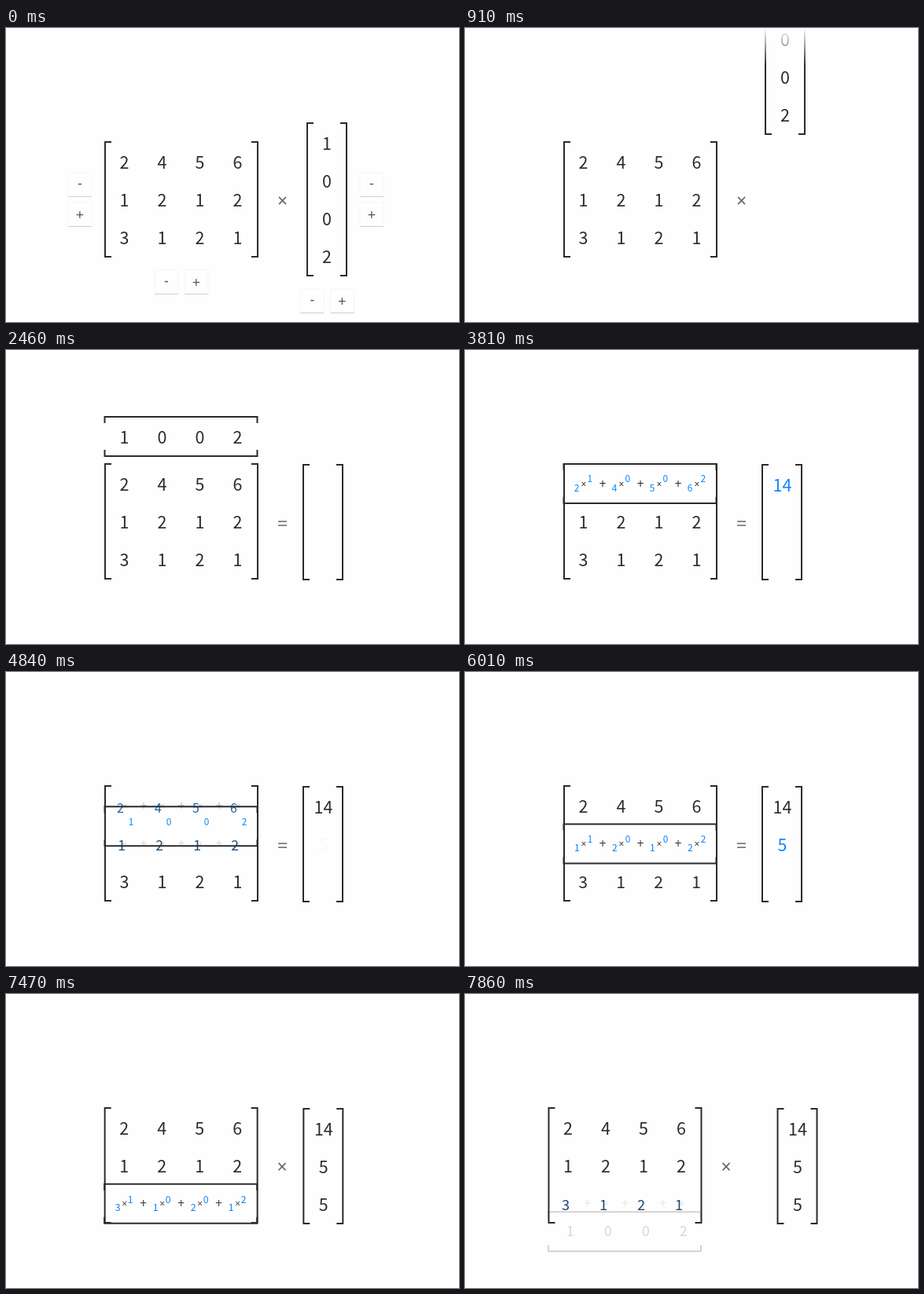
Recreate the animation shown at these times as an HTML page. Size 576 by 374 pixels, loop 8 s.

```html
<!DOCTYPE html>
<html lang="en">
<head>
<meta charset="utf-8">
<title>Matrix times vector</title>
<style>
  html, body { margin: 0; height: 100%; overflow: hidden; background: #fefefe; }
  svg { display: block; width: 100%; height: 100%; }
  text { text-anchor: middle; }
  .digit { font: 21.5px "Noto Sans CJK SC", "Noto Sans CJK JP", "Noto Sans CJK", "Open Sans", sans-serif; fill: #2b2b2b; }
  .op { font-family: "Noto Sans", "Open Sans", sans-serif; fill: #333; }
  .bracket { fill: none; stroke: #2b2b2b; stroke-width: 2; }
</style>
</head>
<body>
<svg id="stage" viewBox="0 0 576 374">
  <defs>
    <linearGradient id="veil" x1="0" y1="0" x2="0" y2="1">
      <stop offset="0" stop-color="#fefefe"/>
      <stop offset="1" stop-color="#fefefe" stop-opacity="0"/>
    </linearGradient>
  </defs>
</svg>
<script>
const LOOP = 8000;
const MATRIX = [[2, 4, 5, 6], [1, 2, 1, 2], [3, 1, 2, 1]];
const VECTOR = [1, 0, 0, 2];
const PRODUCTS = MATRIX.map(row => row.reduce((sum, v, i) => sum + v * VECTOR[i], 0));
const STEPS = [3040, 4480, 5920, 7360];   // start of each downward move
const MOVE = 700, MORPH = 820, PITCH = 48, SMALL = 0.55;
const INK = [43, 43, 43], BLUE = [10, 132, 255];
const PIVOT = { x: 350.75, y: 166.25 }, ARM = { x: 56.25, y: -128.25 };

const stage = document.getElementById('stage');

function add(parent, tag, attrs, content) {
  const el = document.createElementNS('http://www.w3.org/2000/svg', tag);
  for (const name in attrs) el.setAttribute(name, attrs[name]);
  if (content !== undefined) el.textContent = content;
  parent.appendChild(el);
  return el;
}
const group = parent => add(parent, 'g', {});
const digit = (parent, value) => add(parent, 'text', { class: 'digit', y: 7.9 }, value);

function operator(parent, sign, x, y, size, fill = '#333') {
  const rise = sign === '-' ? 0.27 : 0.357;
  return add(parent, 'text', { class: 'op', x, y: y + rise * size, 'font-size': size, fill, style: `fill:${fill}` }, sign);
}

// Pair of square brackets, w by h, centred on the group origin
function brackets(parent, w, h) {
  const x = w / 2 - 1, y = h / 2 - 1, lip = w / 2 - 9;
  const d = [-1, 1].map(s => `M${s * lip} ${-y}H${s * x}V${y}H${s * lip}`).join('');
  return add(parent, 'path', { class: 'bracket', d });
}

function button(parent, sign, x, y) {
  add(parent, 'rect', { x: x - 15, y: y - 15, width: 30, height: 30, fill: '#fefefe', stroke: '#f5f5f5' });
  add(parent, 'rect', { x: x - 15, y: y + 15, width: 30, height: 1, fill: '#d0d0d0' });
  operator(parent, sign, x, y + 0.5, 18, '#555');
}

const move = (el, x, y, extra = '') => el.setAttribute('transform', `translate(${x} ${y})${extra}`);
const clamp = v => Math.min(1, Math.max(0, v));
const ramp = (t, start, length) => clamp((t - start) / length);
const cubic = p => p < 0.5 ? 4 * p ** 3 : 1 - 4 * (1 - p) ** 3;
const smooth = p => p * p * (3 - 2 * p);
const mix = (a, b, k) => a + (b - a) * k;
const tint = k => `rgb(${INK.map((c, i) => Math.round(mix(c, BLUE[i], k))).join(',')})`;

// A digit that shrinks, turns blue and slides aside as k goes from 0 to 1
function placeDigit(el, x, y, k, dx, dy) {
  move(el, x + dx * k, y + mix(1, dy, k), ` scale(${mix(1, SMALL, k)})`);
  el.style.fill = tint(k);
}

const buttons = group(stage);
for (const [x, y, dx, dy] of [[94, 199, 0, 38], [465, 199, 0, 38], [204, 323, 38, 0], [389.5, 347, 38, 0]]) {
  button(buttons, '-', x, y);
  button(buttons, '+', x + dx, y + dy);
}

const matrix = group(stage);
move(brackets(matrix, 196, 148), 223, 218);
const matrixRows = MATRIX.map((row, r) => {
  const y = 170 + r * PITCH, signs = group(matrix);
  row.forEach((_, c) => {
    const x = 150.5 + c * PITCH;
    operator(signs, '×', x + 0.5, y + 1, 12);
    if (c < 3) operator(signs, '+', x + 24.5, y, 16);
  });
  return { y, signs, digits: row.map(v => digit(matrix, v)) };
});
const times = operator(matrix, '×', 351.5, 220, 23, '#666');
const equals = operator(matrix, '=', 351.5, 220, 24, '#777');

const result = group(stage);
move(brackets(result, 52, 148), 403, 219);
const results = PRODUCTS.map((v, r) => {
  const el = digit(result, v);
  move(el, 403.5, 172 + r * PITCH);
  return el;
});

const vector = group(stage);
const vectorBracket = brackets(vector, 52, 196);
const vectorDigits = VECTOR.map(v => digit(vector, v));
add(stage, 'rect', { width: 576, height: 48, fill: 'url(#veil)' });

function vectorPose(t, leave) {
  const lift = cubic(ramp(t, 325, 500));
  const turn = cubic(ramp(t, 885, 1000)) * Math.PI / 2;
  if (turn === 0) return { x: 408 - lift, y: 218 - 180 * lift, turn };
  const cos = Math.cos(turn), sin = Math.sin(turn);
  const down = [60, PITCH, PITCH].reduce((sum, d, i) => sum + d * cubic(ramp(t, STEPS[i], MOVE)), 0);
  return {
    x: PIVOT.x + ARM.x * cos + ARM.y * sin - 21.5 * leave,
    y: PIVOT.y - ARM.x * sin + ARM.y * cos + down + 40 * leave,
    turn
  };
}

function render(t) {
  const leave = cubic(ramp(t, STEPS[3], MOVE));
  const morph = STEPS.map(s => smooth(ramp(t, s, MORPH)));

  buttons.setAttribute('opacity', 1 - ramp(t, 380, 250));
  move(matrix, -21.5 * leave, 0);
  move(result, 21.5 * leave, 0);
  result.setAttribute('opacity', smooth(ramp(t, 2050, 380)));

  const equal = t >= 1690 && t < STEPS[3] + 100;
  times.setAttribute('opacity', equal ? 0 : 1);
  equals.setAttribute('opacity', equal ? 1 : 0);

  matrixRows.forEach(({ y, signs, digits }, r) => {
    const k = morph[r] - morph[r + 1];
    signs.setAttribute('opacity', k * k);
    digits.forEach((el, c) => placeDigit(el, 150.5 + c * PITCH, y, k, -8.5, 5.5));
    results[r].setAttribute('opacity', ramp(t, STEPS[r] + 350, 350));
    results[r].style.fill = tint(t < STEPS[r + 1] + 100 ? 1 : 0);
  });

  const { x, y, turn } = vectorPose(t, leave);
  const k = morph[0] - morph[3];
  vector.setAttribute('opacity', 1 - 0.88 * leave);
  move(vectorBracket, x, y, ` rotate(${-turn * 180 / Math.PI})`);
  vectorDigits.forEach((el, i) => {
    const along = (i - 1.5) * PITCH;
    placeDigit(el, x + along * Math.sin(turn), y + along * Math.cos(turn), k, 8.5, -6);
  });
}

const began = performance.now();
function tick() {
  render((performance.now() - began) % LOOP);
  requestAnimationFrame(tick);
}
tick();
</script>
</body>
</html>
```
